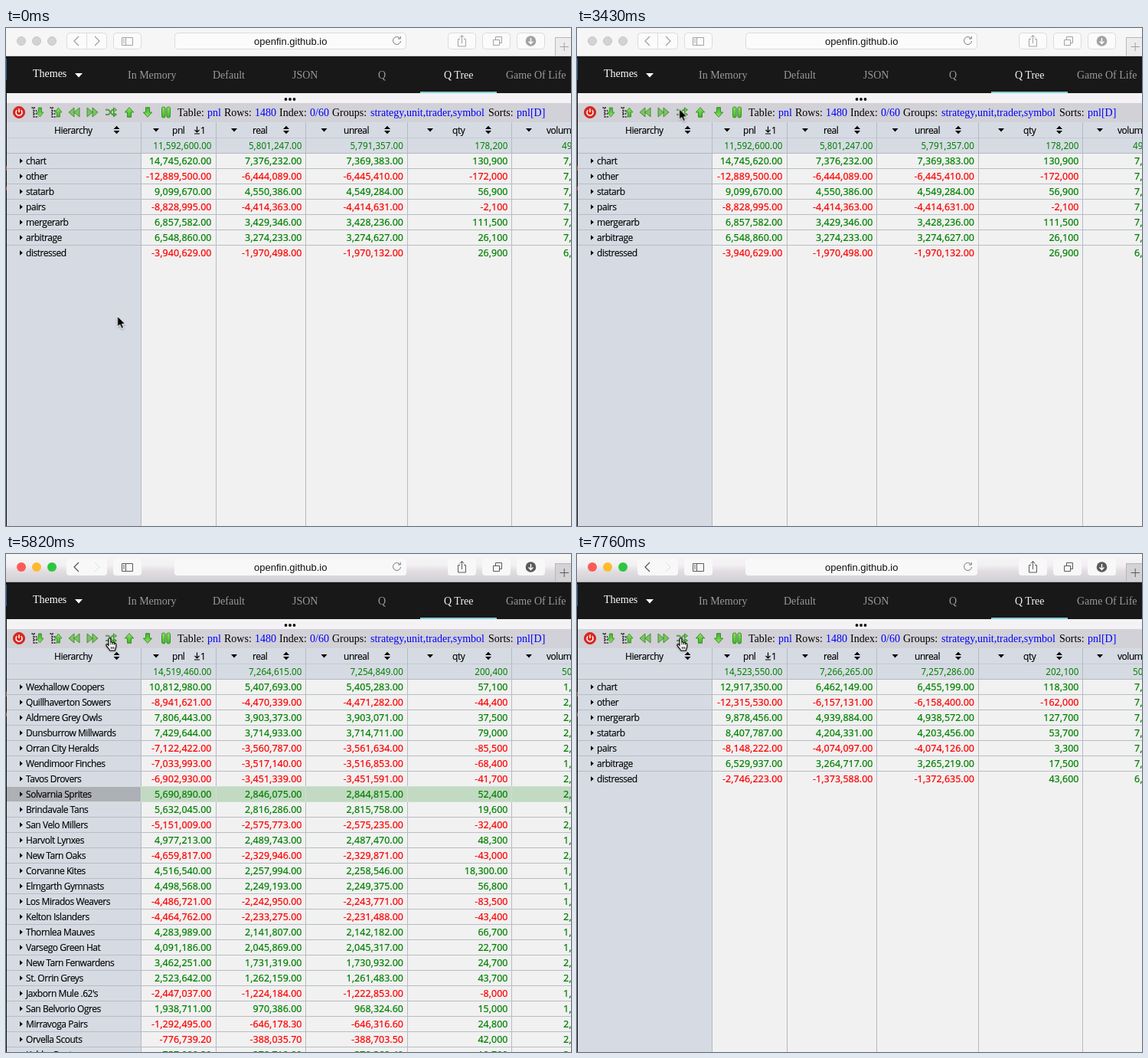
Animation, 738 px wide and 650 px high, one loop 8000 ms. Source, as an HTML page:

```html
<!DOCTYPE html>
<html lang="en">
<head>
<meta charset="utf-8">
<title>Q Tree</title>
<style>
html, body { margin: 0; width: 100%; height: 100%; overflow: hidden; background: #f1f1f1; }
svg { display: block; width: 738px; height: 650px; }
text { white-space: pre; }
.serif { font: 14px "Liberation Serif", serif; }
.url { font: 13px "Liberation Sans", sans-serif; text-anchor: middle; }
.label { font: 12px "Open Sans", sans-serif; letter-spacing: -.45px; stroke: #000; stroke-width: .15px; }
.sum { font: 11.7px "Noto Sans", sans-serif; }
.num { font: 12.5px "Noto Sans", sans-serif; stroke-width: .2px; }
.end { text-anchor: end; }
.up { fill: #008000; stroke: #008000; }
.down { fill: #f00; stroke: #f00; }
.sum.up { stroke: none; }
.blue { fill: #00f; }

.timed { animation: 8s step-end infinite; }
.idle { animation-name: idle; }
.active { animation-name: active; }
.first { animation-name: first; }
.second { animation-name: second; }
.third { animation-name: third; }
.byStrategy { animation-name: byStrategy; }
.byUnit { animation-name: byUnit; }
.arrow { animation-name: arrow; }
.hand { animation-name: hand; }
@keyframes idle { 0% { opacity: 1 } 48.5%, 100% { opacity: 0 } }
@keyframes active { 0% { opacity: 0 } 48.5%, 100% { opacity: 1 } }
@keyframes first { 0% { opacity: 1 } 72.75%, 100% { opacity: 0 } }
@keyframes second { 0% { opacity: 0 } 72.75% { opacity: 1 } 93.375%, 100% { opacity: 0 } }
@keyframes third { 0% { opacity: 0 } 93.375%, 100% { opacity: 1 } }
@keyframes byStrategy { 0% { opacity: 1 } 78.375% { opacity: 0 } 97%, 100% { opacity: 1 } }
@keyframes byUnit { 0% { opacity: 0 } 78.375% { opacity: 1 } 97%, 100% { opacity: 0 } }
@keyframes arrow {
  0% { transform: translate(145.5px, 376px) }
  1.75% { transform: translate(130px, 366px) }
  5.5% { transform: translate(129.5px, 366px) }
  13% { transform: translate(131px, 352px) }
  14.75% { transform: translate(138px, 270px) }
  16.625% { transform: translate(142.5px, 188px) }
  18.5% { transform: translate(141px, 142px) }
  20.375% { transform: translate(139px, 120px) }
  22.25% { transform: translate(138px, 111px) }
  26% { transform: translate(146px, 122px) }
  27.875% { transform: translate(166px, 148px) }
  29.75% { transform: translate(177px, 159px) }
  31.625% { transform: translate(160px, 138px) }
  33.5% { transform: translate(143px, 114px) }
  35.375% { transform: translate(134.5px, 106px) }
  41% { transform: translate(131.5px, 107px) }
  42.875% { transform: translate(133.5px, 105.5px); opacity: 1 }
  54%, 100% { transform: translate(133.5px, 105.5px); opacity: 0 }
}
@keyframes hand {
  0% { opacity: 0; transform: translate(130px, 112px) }
  54% { opacity: 1; transform: translate(130px, 112px) }
  55.875% { opacity: 1; transform: translate(130px, 111px) }
  61.5%, 100% { opacity: 1; transform: translate(130px, 109px) }
}
</style>
</head>
<body>
<svg id="stage" viewBox="0 0 738 650" xmlns="http://www.w3.org/2000/svg"></svg>
<script>
const text = (x, y, s, cls, more = '') => `<text x="${x}" y="${y}" class="${cls}" ${more}>${s}</text>`;
const rect = (x, y, w, h, fill, more = '') =>
  `<rect x="${x}" y="${y}" width="${w}" height="${h}" fill="${fill}" ${more}/>`;
const path = (d, more = '') => `<path d="${d}" ${more}/>`;
const at = (x, y, body) => `<g transform="translate(${x} ${y})">${body}</g>`;
const scale = (x, y, body) => `<g transform="scale(${x} ${y})">${body}</g>`;
const timed = (cls, body) => `<g class="timed ${cls}">${body}</g>`;

// Browser toolbar
function chrome(on) {
  const ink = on ? '#5a5a5a' : '#a2a2a2';
  const lights = on ? ['#fc5b55', '#fdba2c', '#2dc63f'] : ['#d3d3d3', '#d3d3d3', '#d3d3d3'];
  const rim = on ? '' : 'stroke="#c6c6c6"';
  const button = (x, w) => on
    ? rect(x, 6, w, 22, '#f8f8f8', 'rx="4"')
    : rect(x + .5, 6.5, w - 1, 21, '#fbfbfb', 'rx="4" stroke="#dcdcdc"');
  return rect(0, 0, 738, 37, on ? 'url(#bar)' : '#f6f6f6') +
    lights.map((c, i) => `<circle cx="${20 + 20 * i}" cy="17" r="${on ? 6 : 5.5}" fill="${c}" ${rim}/>`).join('') +
    [[79, 53], [140, 37], [220, 303], [577, 37], [622, 37], [667, 37]].map(b => button(...b)).join('') +
    (on ? '' : rect(105, 7, 1, 20, '#dcdcdc')) +
    rect(717.5, 12.5, 24, 25, on ? '#d3d2d5' : '#ececec', 'stroke="#b8b8b8"') +
    `<g fill="none" stroke="${ink}">` +
    path('M95 11L89 17L95 23', 'stroke-width="1.3"') +
    path('M116 11L122 17L116 23', on ? 'stroke="#dedede"' : 'stroke-width="1.3"') +
    path('M151.5 12.5H165.5V22.5H151.5ZM156.5 12.5V22.5M153 15H155M153 17H155M153 19H155') +
    path('M514.6 13.6A5 5 0 1 0 515.5 17M515.3 10.8V14H512', 'stroke="#777"') +
    path('M593 14.5H590.5V24H600.5V14.5H598M595.5 20V9.5M592.5 12.5L595.5 9.5L598.5 12.5') +
    path('M636.5 15.5H644.5V22.5H636.5ZM639.5 15V11.5H647.5V19.5H645') +
    path('M723.5 24.5H735M729.2 19V30') + '</g>' +
    `<circle cx="685.5" cy="17" r="6.8" fill="${ink}"/>` +
    path('M685.5 13V20.5M682.5 17.6L685.5 20.6L688.5 17.6', 'fill="none" stroke="#fff" stroke-width="1.4"') +
    text(371.8, 22, 'openfin.github.io', 'url', 'fill="#111"') +
    rect(0, 36, 738, 1, on ? '#a9a8ab' : '#cfcfcf');
}

// Navigation and splitter
function nav() {
  const items = [['In Memory', 159], ['Default', 270], ['JSON', 374], ['Q', 486], ['Q Tree', 572], ['Game Of Life', 653]];
  return rect(0, 37, 738, 48, '#181818') +
    text(35, 64, 'Themes', 'serif', 'fill="#fff"') +
    path('M90 59H100L95 64.5Z', 'fill="#fff"') +
    items.map(([s, x]) => text(x, 66, s, 'serif', `fill="${s == 'Q Tree' ? '#f2f2f2' : '#999'}"`)).join('') +
    rect(541, 83, 100, 2, '#7fcfd4') +
    rect(0, 85, 738, 13, '#f4f2f4') +
    [365.5, 371, 376.5].map(x => `<circle cx="${x}" cy="93" r="1.9" fill="#111"/>`).join('');
}

// Table toolbar
function tools() {
  const leaf = 'fill="url(#leaf)" stroke="#2f8a1f" stroke-width=".9"';
  const up = path('M-5.7 0L0 -6.3L5.7 0H2.5V6.3H-2.5V0Z', leaf);
  const back = path('M0 -6V6L-7 0ZM7 -6V6L0 0Z', 'fill="#7cc463" stroke="#3c8a2c" stroke-width=".9"');
  const tree = path('M-7.5 -6H-3M-5 -6V6.5M-5 -2H0M-5 2H0M-5 6H1',
    'fill="none" stroke="#3a3a3a" stroke-width="1.8" stroke-dasharray="1.6 1.2"');
  const small = `<g transform="translate(3.4 0) scale(.8 .95)">${up}</g>`;
  const icons = [
    '<circle r="7.6" fill="#e0261d" stroke="#b3140e" stroke-width=".7"/>' +
      path('M-2.6 -2.8A4 4 0 1 0 2.6 -2.8M0 -4.8V0', 'fill="none" stroke="#fff" stroke-width="1.5"'),
    tree + scale(1, -1, small),
    tree + small,
    back,
    scale(-1, 1, back),
    path('M-7 -3.3H-3L2 3H4M-7 3H-3L2 -3.3H4', 'fill="none" stroke="#5b9c4c" stroke-width="2"') +
      path('M3.5 -6L7.5 -3.2L3.5 -.4ZM3.5 .2L7.5 3L3.5 5.8Z', leaf),
    up,
    scale(1, -1, up),
    [-5.5, .9].map(x => rect(x, -7, 4.6, 14, 'url(#leaf)', 'rx="2" stroke="#2f8a1f" stroke-width=".9"')).join('')
  ];
  const info = [['Table:', 224, 'pnl', 263], ['Rows:', 285, '1480', 325], ['Index:', 357, '0/60', 397],
    ['Groups:', 426, '', 476], ['Sorts:', 630, 'pnl[D]', 667]];
  return rect(0, 98, 738, 25, '#d1d1d7') +
    icons.map((s, i) => at(17 + 24 * i, 110, s)).join('') +
    info.map(([k, x, v, vx]) => text(x, 115, k, 'serif') + text(vx, 115, v, 'serif blue')).join('') +
    timed('byStrategy', text(476, 115, 'strategy,unit,trader,symbol', 'serif blue')) +
    timed('byUnit', text(476, 115, 'unit,strategy,trader,symbol', 'serif blue'));
}

// Table frame and header
function grid() {
  const menu = x => path(`M${x - 4} 131H${x + 4}L${x} 135.5Z`);
  const sorter = x => path(`M${x - 4} 132H${x + 4}L${x} 127.8ZM${x - 4} 134H${x + 4}L${x} 138.2Z`);
  const heads = [['pnl', 217, 196], ['real', 322, 298], ['unreal', 441, 415.5], ['qty', 583, 554], ['volume', 706, 683]];
  return rect(0, 123, 738, 527, '#f1f1f1') +
    rect(0, 123, 176, 527, '#d6dbe3') + rect(176, 123, 562, 40, '#d6dbe3') +
    rect(1, 143, 737, 1, '#c3c9d1') + rect(1, 163, 737, 1, '#b2b8bf') +
    [176, 274, 391, 524, 660].map(x => rect(x, 123, 1, 527, '#b3bbc2')).join('') +
    text(63, 138, 'Hierarchy', 'label') +
    heads.map(([s, x, m]) => text(x, 138, s, 'label') + menu(m)).join('') +
    [144.5, 366, 498, 630].map(sorter).join('') +
    path('M249.5 128.5V136M246.5 133L249.5 136L252.5 133M246 138H253', 'fill="none" stroke="#000" stroke-width="1.2"') +
    text(254, 138, '1', 'label');
}

// Amounts are shown with seven significant digits
const amount = v => Number(v.toPrecision(7)).toLocaleString('en-US', { minimumFractionDigits: 2 });
const count = v => v.toLocaleString('en-US');

// Fill and pale outline of the highlighted row
function highlight(y) {
  const edges = [0, 176, 274, 391, 524, 660, 740];
  return edges.slice(1).map((x, i) =>
    rect(edges[i] + .5, y + .5, x - edges[i], 20, i ? '#c1dac1' : '#adb1b6', 'stroke="#d3dcd5"')).join('');
}

// Each line: name, real, unreal, quantity; pnl is the sum of real and unreal
function table(lines, volumes, picked) {
  const rows = lines.trim().split('\n').map(s => s.trim().split('|'));
  const line = ([name, real, unreal, qty], i) => {
    const y = 143 + 20 * i, base = y + 15, font = i ? 'num' : 'sum';
    const cells = [amount(+real + +unreal), amount(+real), amount(+unreal), qty.includes('.') ? amount(+qty) : count(+qty)];
    const paint = s => `${font} end ${s[0] == '-' ? 'down' : 'up'}`;
    return (i && i < rows.length - 1 ? rect(1, y + 20, 737, 1, '#b7bdc2') : '') +
      (i == picked ? highlight(y) : '') +
      (i ? path(`M18 ${y + 7.3}L21.8 ${y + 10.5}L18 ${y + 13.7}Z`) + text(26, base, name, 'label') : '') +
      cells.map((s, c) => text([268.5, 386.5, 519, 655.5][c], base, s, paint(s))).join('') +
      text(i ? 728 : 726, base, i ? volumes[i - 1] + ',' : volumes.at(-1), `${font} up`);
  };
  return rows.map(line).join('');
}

const start = `
  |5801247|5791357|178200
  chart|7376232|7369383|130900
  other|-6444089|-6445410|-172000
  statarb|4550386|4549284|56900
  pairs|-4414363.4|-4414631.4|-2100
  mergerarb|3429346|3428236|111500
  arbitrage|3274233|3274627|26100
  distressed|-1970497.6|-1970131.6|26900`;
const teams = `
  |7264615|7254849|200400
  Wexhallow Coopers|5407693|5405283|57100
  Quillhaverton Sowers|-4470339|-4471282|-44400
  Aldmere Grey Owls|3903372.6|3903070.6|37500
  Dunsburrow Millwards|3714933|3714711|79000
  Orran City Heralds|-3560787.4|-3561634.4|-85500
  Wendimoor Finches|-3517140|-3516853|-68400
  Tavos Drovers|-3451339|-3451591|-41700
  Solvarnia Sprites|2846075|2844815|52400
  Brindavale Tans|2816286.4|2815758.4|19600
  San Velo Millers|-2575773.4|-2575235.4|-32400
  Harvolt Lynxes|2489743|2487470|48300
  New Tarn Oaks|-2329946|-2329871|-43000
  Corvanne Kites|2257994|2258546|18300.00
  Elmgarth Gymnasts|2249193|2249375|56800
  Los Mirados Weavers|-2242950|-2243771|-83500
  Kelton Islanders|-2233274.6|-2231487.6|-43400
  Thornlea Mauves|2141807|2142182|66700
  Varsego Green Hat|2045869|2045317|22700
  New Tarn Fenwardens|1731319|1730932|24700
  St. Orrin Greys|1262159|1261483|43700
  Jaxborn Mule .62's|-1224184|-1222853|-8000
  San Belvorio Ogres|970386|968324.6|15000
  Mirravoga Pairs|-646178.3|-646316.6|24800
  Orvella Scouts|-388035.7|-388703.5|42000
  Keldar Boatmen|378710.8|378369.4|10700`;
const finish = `
  |7266265|7257286|202100
  chart|6462149|6455199|118300
  other|-6157131|-6158400|-162000
  mergerarb|4939884|4938572|127700
  statarb|4204331|4203456|53700
  pairs|-4074096.6|-4074125.6|3300
  arbitrage|3264717.4|3265219.4|17500
  distressed|-1373588|-1372635|43600`;
const sevens = [...'7777776'];

const defs = `<defs>
  <linearGradient id="bar" x2="0" y2="1">
    <stop offset="0" stop-color="#f6f6f6"/><stop offset=".4" stop-color="#f2f0f2"/>
    <stop offset=".6" stop-color="#e2dde2"/><stop offset="1" stop-color="#d0d0d3"/>
  </linearGradient>
  <linearGradient id="leaf" x2="0" y2="1">
    <stop offset="0" stop-color="#8fe262"/><stop offset="1" stop-color="#3fb52a"/>
  </linearGradient>
  <filter id="shade" x="-50%" y="-50%" width="200%" height="200%">
    <feDropShadow dx="0" dy="1" stdDeviation=".8" flood-opacity=".35"/>
  </filter>
</defs>`;

const pointer = path('M0 0V14.2L3.3 11.2L5.6 16.4L8.2 15.3L6 10.3H10.3Z',
  'stroke="#fff" stroke-width="1" filter="url(#shade)"');
const glove = '<g stroke="#000" stroke-width="1.1" fill="#fff" filter="url(#shade)">' +
  path('M4 10.5V2.2C4 .3 6.8 .3 6.8 2.2V6.6C7.2 5.4 9.2 5.6 9.3 7C9.8 6.1 11.5 6.4 11.6 7.8' +
    'C12.2 7 13.8 7.4 13.8 9V11.5C13.8 13.5 12.6 14.5 12.4 17H5.8C5.4 15.2 2.6 13 1 10.4C.2 9 2 8 3 9.2Z') +
  path('M6.8 6.5V9.5M9.3 7V9.5M11.6 7.8V10M7.3 12V15M9.1 12V15M10.9 12V15', 'fill="none" stroke-width=".8"') + '</g>';

const edge = rect(0, 37, 1, 613, '#111') + rect(0, 40, 1, 28, '#2c5a8c') +
  rect(0, 180, 1, 6, '#a3452c') + rect(0, 207, 1, 5, '#a3452c');

document.getElementById('stage').innerHTML = defs +
  timed('idle', chrome(false)) + timed('active', chrome(true)) +
  nav() + tools() + grid() +
  timed('first', table(start, [...sevens, '49'])) +
  timed('second', table(teams, [...'1222212212121112112211222', '50'], 8)) +
  timed('third', table(finish, [...sevens, '50'])) +
  edge + timed('arrow', pointer) + timed('hand', glove);
</script>
</body>
</html>
```
